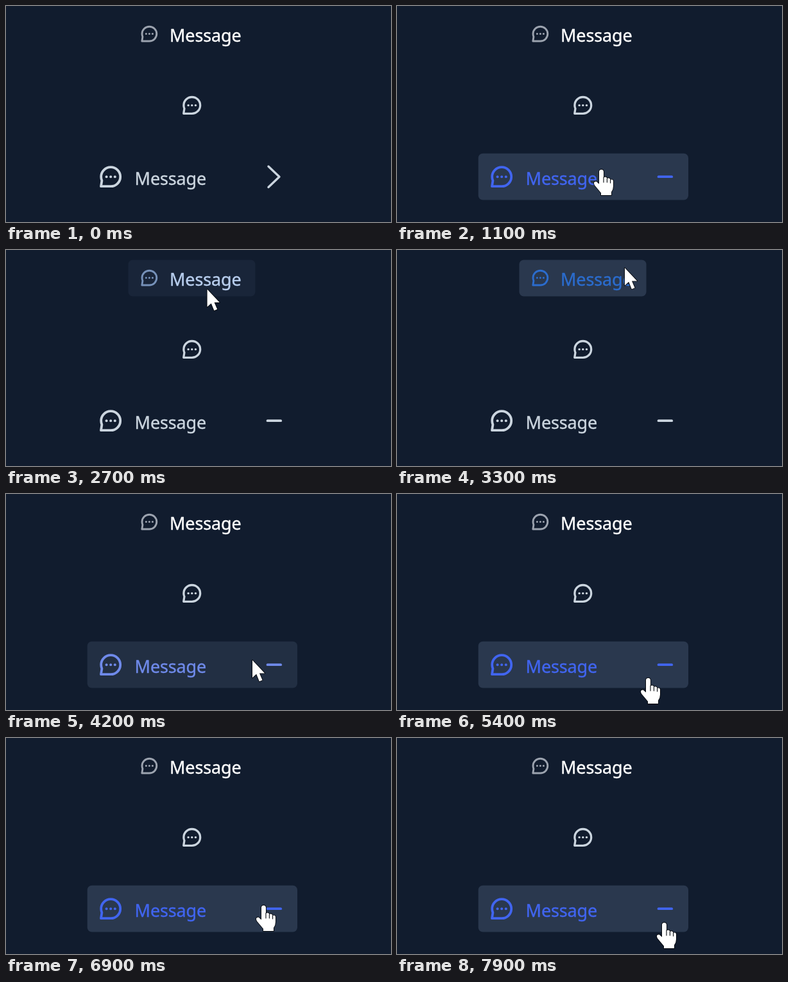
These frames come from a looping animation (600x338 px, 8 s). An HTML page with a canvas:

```html
<!DOCTYPE html>
<html lang="en">
<head>
<meta charset="utf-8">
<title>Button hover states</title>
<style>
  html, body { margin: 0; width: 100%; height: 100%; overflow: hidden; background: #111c2e; }
  canvas { display: block; width: 600px; height: 338px; }
</style>
</head>
<body>
<canvas id="stage" width="600" height="338"></canvas>
<script>
const ctx = document.getElementById('stage').getContext('2d');
const LOOP = 8000, STEP = 100, ENTER = 300, CLICK = 1100;
const BG = [17, 28, 46], PANEL = [42, 56, 78];
const SOFT = [203, 213, 223], WHITE = [255, 255, 255], GRAY = [156, 163, 175];
const BLUE = [65, 101, 240], DEEP = [43, 108, 205];

const TOP = { x: 190.5, y: 15.5, w: 198, h: 57 };
const ROUND = { x: 254, y: 128, w: 71, h: 54 };
const CARD = { x: 126.7, y: 230.7, w: 327.3, h: 72.8 };

// Pointer journeys, each starting where the last one ended
const HOME = { x: 319, y: 256 };
const MOVES = [
  { from: 1300, to: 2000, x: 285, y: 133 },
  { from: 2000, to: 2300, x: 289, y: 148 },
  { from: 2400, to: 2900, x: 330, y: 4 },
  { from: 2900, to: 3300, x: 355, y: 28 },
  { from: 3600, to: 4100, x: 384, y: 260 },
  { from: 4800, to: 5400, x: 392, y: 288 },
  { from: 5400, to: 5700, x: 584, y: 272 },
  { from: 5800, to: 6200, x: 402, y: 262 },
  { from: 6900, to: 7200, x: 513, y: 270 },
  { from: 7200, to: 7800, x: 417, y: 289 }
];

const clamp = v => Math.max(0, Math.min(1, v));
const lerp = (a, b, k) => a + (b - a) * k;
const mix = (a, b, k) => a.map((v, i) => lerp(v, b[i], k));
const rgb = c => `rgb(${c.map(Math.round).join(',')})`;

function pointerAt(t) {
  return MOVES.reduce((p, m) => {
    const k = clamp((t - m.from) / (m.to - m.from));
    return { x: lerp(p.x, m.x, k), y: lerp(p.y, m.y, k) };
  }, HOME);
}

function inside(box, t) {
  if (t < ENTER) return false;
  const { x, y } = pointerAt(t);
  return x >= box.x && x <= box.x + box.w && y >= box.y && y <= box.y + box.h;
}

// How many of the last n steps the pointer spent in the box, 0 to 1
function dwell(box, t, n) {
  let hits = 0;
  for (let i = 0; i < n; i++) hits += inside(box, t - i * STEP);
  return hits / n;
}

function panel(box, k) {
  if (!k) return;
  ctx.fillStyle = rgb(mix(BG, PANEL, k));
  ctx.beginPath();
  ctx.roundRect(box.x, box.y, box.w, box.h, 7);
  ctx.fill();
}

function bubble(x, y, scale, color) {
  ctx.save();
  ctx.translate(x, y);
  ctx.scale(scale, scale);
  ctx.strokeStyle = ctx.fillStyle = rgb(color);
  ctx.lineWidth = 3.8;
  ctx.beginPath();
  ctx.arc(0, 0, 15, Math.PI / 2, Math.PI * 0.87, true);
  ctx.lineTo(-15.2, 15);
  ctx.closePath();
  ctx.stroke();
  for (const dx of [-6.6, 0, 6.6]) {
    ctx.beginPath();
    ctx.arc(dx, 0, 2, 0, Math.PI * 2);
    ctx.fill();
  }
  ctx.restore();
}

function label(x, y, color) {
  ctx.fillStyle = ctx.strokeStyle = rgb(color);
  ctx.lineWidth = 0.4;
  ctx.fillText('Message', x, y);
  ctx.strokeText('Message', x, y);
}

function toggle(open, color) {
  ctx.strokeStyle = rgb(color);
  ctx.lineWidth = open ? 3.8 : 3.4;
  ctx.beginPath();
  if (open) {
    ctx.moveTo(407.6, 267.2);
    ctx.lineTo(428.2, 267.2);
  } else {
    ctx.moveTo(409, 251);
    ctx.lineTo(426, 267.3);
    ctx.lineTo(409, 283.5);
  }
  ctx.stroke();
}

const arrow = new Path2D('M0 0V27.5L6.2 21.8L10.8 33.2L15.6 31.2L11 20.4H19.2Z');
const hand = new Path2D('M-4 3Q-3.6 0 -.5 0Q3 0 3 4V12.5Q7.2 9.8 8.4 14Q12.4 11.8 13.6 16' +
  'Q17.8 14.4 18 18.5V26Q18 31 15 35V40H-1V36.5L-11 24.5Q-14 18.5 -8.5 18.5L-4 22.5Z');
const knuckles = new Path2D('M3 12V20M8.4 14V20M13.6 16V21');

function pointer({ x, y }, isHand) {
  const shape = isHand ? hand : arrow;
  ctx.save();
  ctx.translate(x, y);
  ctx.strokeStyle = '#05080d';
  ctx.fillStyle = '#fff';
  ctx.lineWidth = 1.8;
  ctx.stroke(shape);
  ctx.fill(shape);
  if (isHand) {
    ctx.lineWidth = 1.1;
    ctx.stroke(knuckles);
  }
  ctx.restore();
}

function draw(t) {
  ctx.fillStyle = rgb(BG);
  ctx.fillRect(0, 0, 600, 338);
  ctx.lineCap = ctx.lineJoin = 'round';
  ctx.font = '27px "Noto Sans", "Open Sans", sans-serif';
  ctx.letterSpacing = '-0.15px';

  const [top, round, card] = [TOP, ROUND, CARD].map(box => dwell(box, t, 3));

  panel(TOP, top);
  bubble(223.4, 43.6, 0.76, mix(GRAY, DEEP, top));
  label(255, 56, mix(WHITE, DEEP, top));

  panel(ROUND, round);
  bubble(289.8, 155.4, 0.86, mix(SOFT, BLUE, round));

  panel(CARD, card);
  const tone = mix(SOFT, BLUE, card);
  bubble(163.2, 267.2, 1, tone);
  label(200.6, 280, tone);
  toggle(t >= CLICK, tone);

  // The arrow becomes a hand once it has rested on a button
  const rested = [TOP, ROUND, CARD].some(box => dwell(box, t, 4) === 1);
  if (t >= ENTER) pointer(pointerAt(t), rested);
}

const start = performance.now();
function tick() {
  const t = (performance.now() - start) % LOOP;
  draw(Math.floor(t / STEP) * STEP);
  requestAnimationFrame(tick);
}
tick();
</script>
</body>
</html>
```
